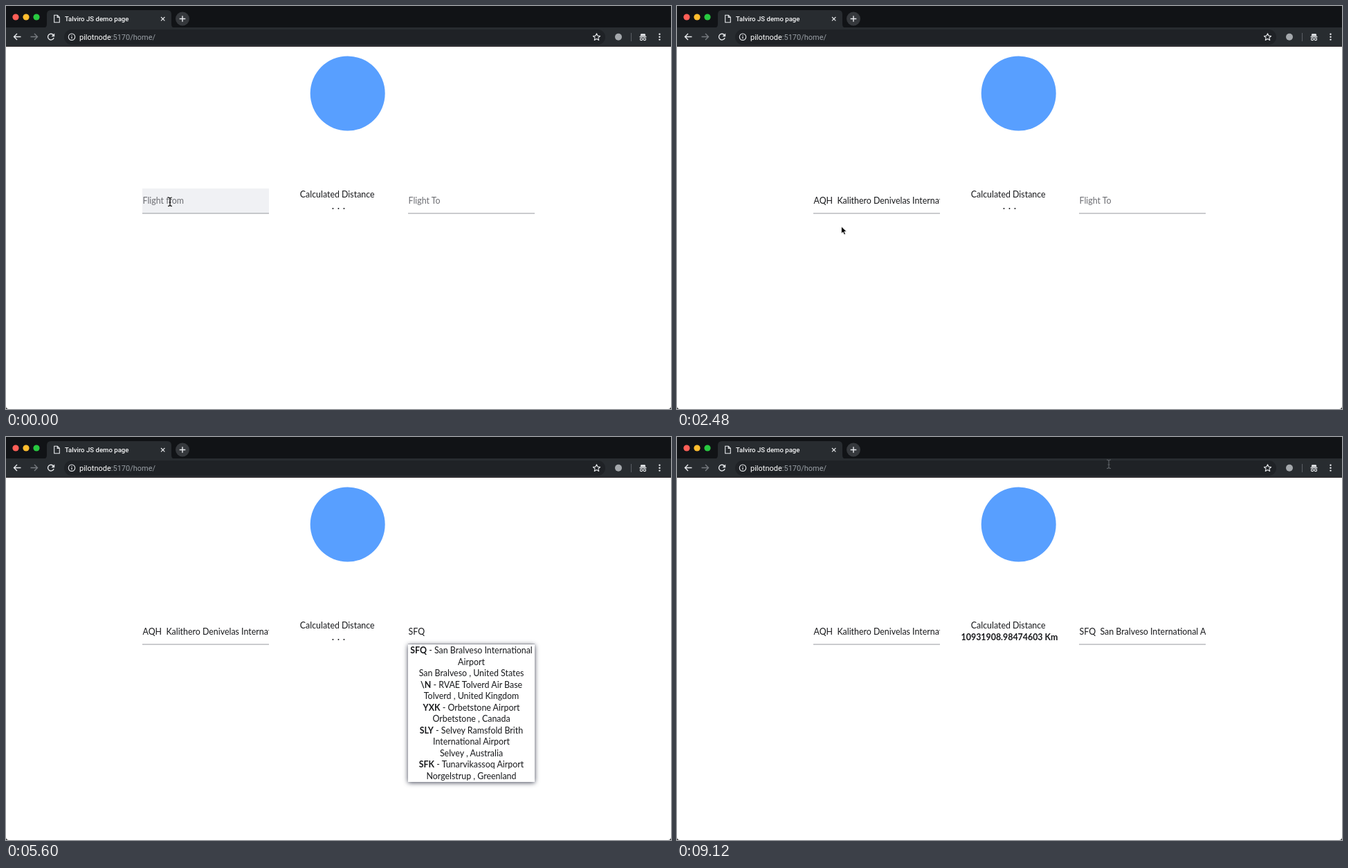
An HTML page for the animation above (9200 ms loop, 961 px wide and 583 px high).

```html
<!DOCTYPE html>
<html lang="en">
<head>
<meta charset="utf-8">
<title>Flight distance demo</title>
<style>
  html, body { margin: 0; width: 100%; height: 100%; overflow: hidden; background: #fff; }
  svg { display: block; width: 961px; height: 583px; }
  text { font: 12.4px Lato, sans-serif; fill: #17181b; white-space: pre; }
  .bold { font-weight: 700; }
  .mid { text-anchor: middle; }
  .tab { font: 500 9.6px Roboto, sans-serif; fill: #f6f7f8; }
  .url { font: 11px Roboto, sans-serif; fill: #9aa0a6; }
  .url tspan { fill: #fff; }
  .icon { fill: none; stroke: #e8eaed; stroke-width: 1.4; }
  .thin { stroke-width: 1.1; }
  .panel { fill: #fff; filter: drop-shadow(0 0 .5px #0006) drop-shadow(0 1.5px 3.5px #1a1f33d8); }
</style>
</head>
<body>
<svg viewBox="0 0 961 583">
  <rect width="961" height="583" fill="#fff"/>

  <!-- Browser frame -->
  <rect width="961" height="32" fill="#111316"/>
  <path d="M53 32q6 0 6-6V12q0-6 6-6H233q6 0 6 6v14q0 6 6 6z" fill="#282c30"/>
  <rect y="31" width="961" height="28" fill="#282c30"/>
  <rect x="84" y="34" width="782" height="22" rx="11" fill="#1f2226"/>
  <rect y="58" width="961" height="1" fill="#3a3436"/>
  <circle cx="14" cy="16" r="4.6" fill="#ff5f57"/>
  <circle cx="29" cy="16" r="4.6" fill="#ffbd2e"/>
  <circle cx="44" cy="16" r="4.6" fill="#28c940"/>
  <path class="icon thin" d="M69.7 13.2h4.6l3 3v7.6h-7.6zM74.2 13.2v3.2h3.1"/>
  <text class="tab" x="85" y="22">Talviro JS demo page</text>
  <path class="icon thin" d="M224 16l5.4 5.4M229.4 16l-5.4 5.4"/>
  <circle cx="255" cy="18.5" r="10" fill="#35383c"/>
  <path class="icon" d="M255 14.2v8.6M250.7 18.5h8.6"/>
  <path class="icon" d="M21.5 44.5h-9.5M16 40l-4.5 4.5l4.5 4.5"/>
  <path class="icon" d="M35.5 44.5h9.5M41 40l4.5 4.5l-4.5 4.5" style="stroke:#777b80"/>
  <path class="icon" d="M68.5 42a4.4 4.4 0 1 0 .6 4"/>
  <path d="M70.2 39.5v4.7h-4.7z" fill="#e8eaed"/>
  <circle class="icon thin" cx="95" cy="44.7" r="4.7"/>
  <path d="M94.4 44h1.2v3.2h-1.2zM94.4 41.9h1.2v1.2h-1.2z" fill="#e8eaed"/>
  <text class="url" x="106" y="48.5"><tspan>pilotnode</tspan>:5170/home/</text>
  <path class="icon thin" stroke-linejoin="round" d="M853.5 39.8l1.5 3.3 3.6.4-2.7 2.4.8 3.5-3.2-1.8-3.2 1.8.8-3.5-2.7-2.4 3.6-.4z"/>
  <circle cx="885" cy="44.7" r="5" fill="#a4a8ac"/>
  <path d="M903.5 39v12" stroke="#5b5f64"/>
  <path d="M917.5 40.3h6l1 3.2h-8zM915.5 44h10v1.2h-10z" fill="#e8eaed"/>
  <g class="icon thin"><circle cx="918.1" cy="47.9" r="1.7"/><circle cx="922.9" cy="47.9" r="1.7"/></g>
  <g fill="#e8eaed"><circle cx="944.5" cy="40.8" r="1.2"/><circle cx="944.5" cy="44.7" r="1.2"/><circle cx="944.5" cy="48.6" r="1.2"/></g>

  <!-- Page -->
  <circle cx="493.7" cy="126.5" r="54" fill="#589fff"/>
  <text class="mid" x="478.7" y="277">Calculated Distance</text>
  <text class="bold mid" id="dots" x="481" y="293.5" letter-spacing="1">. . .</text>
  <text class="bold mid" id="distance" x="480.5" y="293.5">10931908.98474603 Km</text>
  <g id="fields"></g>
  <path d="M0 579v4h4q-4 0-4-4zM961 579v4h-4q4 0 4-4z" fill="#222"/>

  <path id="arrow" d="M0 0v10.2l2.4-2.2 1.7 3.9 1.9-.8-1.7-3.8h3.3z" fill="#000" stroke="#fff" stroke-width=".8"/>
  <path id="beam" d="M-3-6q3 0 3 2q0-2 3-2M0-4v9M-3 6.5q3 0 3-2q0 2 3 2M-1.5 1h3" fill="none" stroke="#111" stroke-width="1.2"/>
</svg>
<script>
const LOOP = 9200, STEP = 80;
const $ = id => document.getElementById(id);

function add(parent, tag, attrs = {}, text = '') {
  const node = document.createElementNS('http://www.w3.org/2000/svg', tag);
  for (const key in attrs) node.setAttribute(key, attrs[key]);
  node.textContent = text;
  parent.append(node);
  return node;
}
const show = (node, on) => node.setAttribute('visibility', on ? 'visible' : 'hidden');

// Each entry: code, then lines of the airport name and its place.
const home = ['AQH', 'Kalithero Denivelas', 'International Airport', 'Velathe , Greece'];
const tuna = ['SFK', 'Tunarvikassoq Airport', 'Norgelstrup , Greenland'];
const lists = {
  AQH: [home,
    ['AQT', 'Marlothen Airport', 'Marlothen , Canada'],
    ['BQH', 'Port Wathely Airport', 'Wathely , Australia'],
    ['KQA', 'Brathwell Airport', 'Brathwell , Ireland'],
    ['TQH', 'Dorathen Airport', 'Dorathen , Germany']],
  S: [['SQV', 'Solmeray Airport', 'Solmeray , France'],
    ['SZR', 'Sarvelda Airport', 'Sarvelda , Spain'],
    ['SKW', 'Stelvorn Airport', 'Stelvorn , Norway'],
    ['SJL', 'Simarote Airport', 'Simarote , Brazil'],
    ['SVY', 'Sondavar Airport', 'Sondavar , India']],
  SF: [['SFN', 'San Dorile International', 'Airport', 'San Dorile , Mexico'],
    tuna,
    ['SFV', 'Sfel Marna International', 'Airport', 'Sfel , Tunisia'],
    ['SFG', 'St-Corvaçin Airport', 'St-Corvaçin , Guadeloupe'],
    ['SFD', 'San Velmardo Airport', 'San Velmardo , Philippines']],
  SFQ: [['SFQ', 'San Bralveso International', 'Airport', 'San Bralveso , United States'],
    ['\\N', 'RVAE Tolverd Air Base', 'Tolverd , United Kingdom'],
    ['YXK', 'Orbetstone Airport', 'Orbetstone , Canada'],
    ['SLY', 'Selvey Ramsfold Brith', 'International Airport', 'Selvey , Australia'],
    tuna]
};

// Timelines hold [start, value] pairs.
const at = (line, t) => line.reduce((value, [start, next]) => t >= start ? next : value, '');

function makeList(parent, x, items) {
  const group = add(parent, 'g');
  const panel = add(group, 'rect', { class: 'panel', x, y: 300, width: 183 });
  let row = 0;
  for (const [code, ...lines] of items) {
    lines.forEach((line, i) => {
      const text = add(group, 'text', { class: 'mid', x: x + 91.5, y: 313 + 16.5 * row++ });
      if (!i) add(text, 'tspan', { class: 'bold' }, code);
      add(text, 'tspan', {}, i ? line : ' - ' + line);
    });
  }
  panel.setAttribute('height', 16.5 * row + 1);
  return group;
}

function makeField(x, hint, focus, values, panels) {
  const root = $('fields');
  const back = add(root, 'rect', { x, y: 264, width: 183, height: 36, fill: '#f0f1f4' });
  add(root, 'rect', { x, y: 299.5, width: 183, height: 1, fill: '#95989e' });
  const clip = add(root, 'clipPath', { id: 'clip' + x });
  add(clip, 'rect', { x, y: 264, width: 183, height: 36 });
  const holder = add(root, 'g', { 'clip-path': `url(#clip${x})` });
  const text = add(holder, 'text', { x: x + .5, y: 286 });
  const caret = add(root, 'rect', { y: 274, width: 1, height: 16, fill: '#222' });
  const menus = panels.filter(p => p[1]).map(([, key]) => [key, makeList(root, x, lists[key])]);

  return (t, mouse) => {
    const value = at(values, t), open = at(panels, t);
    const focused = t >= focus[0] && t < focus[1];
    const over = mouse.x > x && mouse.x < x + 183 && mouse.y > 264 && mouse.y < 300;
    text.textContent = value || hint;
    text.style.fill = value ? '#17181b' : '#6c6d72';
    caret.setAttribute('x', x + .5 + (value ? text.getComputedTextLength() : 0));
    const lastKey = values.reduce((last, [start]) => t >= start ? start : last, focus[0]);
    show(caret, focused && (t - lastKey) % 1000 < 500);
    show(back, over && mouse.on && !focused);
    menus.forEach(([key, node]) => show(node, key === open));
    return over;
  };
}

const fields = [
  makeField(197, 'Flight from', [640, 2320],
    [[1200, 'A'], [1440, 'AQ'], [1600, 'AQH'], [2320, 'AQH  Kalithero Denivelas International Airport']],
    [[1680, 'AQH'], [2320, '']]),
  makeField(581, 'Flight To', [3200, 6240],
    [[3600, 'S'], [4080, 'SF'], [4720, 'SFQ'], [6240, 'SFQ  San Bralveso International Airport']],
    [[3760, 'S'], [4240, 'SF'], [4880, 'SFQ'], [6240, '']])
];

// Pointer stops: time, x, y.
const path = [[0, 237, 283], [1900, 237, 283], [2240, 237.5, 319], [2640, 237.5, 319],
  [3120, 640, 283], [5760, 640, 283], [6160, 689.5, 323], [6960, 689.5, 323],
  [7200, 694, 340], [7680, 768, 276], [8640, 768, 276], [9040, 624, 39], [LOOP, 624, 39]];

function pointer(t) {
  const i = path.findIndex(stop => stop[0] > t);
  const [t0, x0, y0] = path[i - 1], [t1, x1, y1] = path[i];
  const p = (t - t0) / (t1 - t0), ease = p * p * (3 - 2 * p);
  const typing = (t >= 1200 && t < 1920) || (t >= 3600 && t < 5760);
  return { x: x0 + (x1 - x0) * ease, y: y0 + (y1 - y0) * ease, on: !typing };
}

function draw(now) {
  const t = Math.floor(now % LOOP / STEP) * STEP;
  const mouse = pointer(t);
  const overField = fields.map(update => update(t, mouse)).some(Boolean);
  const inBar = mouse.y > 34 && mouse.y < 56;
  const beam = overField || inBar;
  for (const id of ['arrow', 'beam']) {
    $(id).setAttribute('transform', `translate(${mouse.x} ${mouse.y})`);
    show($(id), mouse.on && beam === (id === 'beam'));
  }
  $('beam').style.stroke = inBar ? '#5c6065' : '#111';
  show($('dots'), t < 6240);
  show($('distance'), t >= 6240);
}

const begin = performance.now();
function tick() {
  draw(performance.now() - begin);
  requestAnimationFrame(tick);
}
tick();
</script>
</body>
</html>
```
